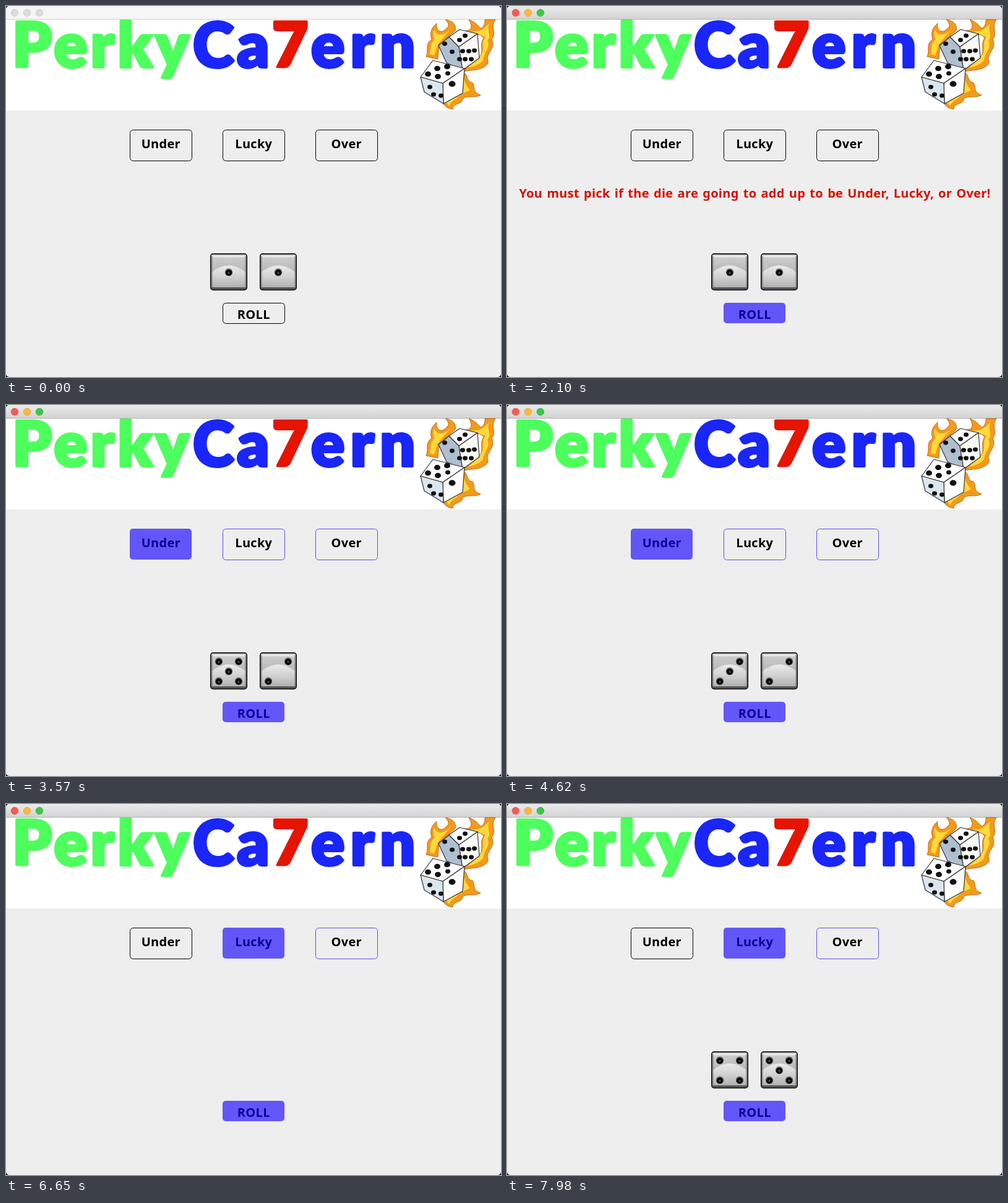
These frames come from a looping animation (800x600 px, 8000 ms). An HTML page:

```html
<!DOCTYPE html>
<html lang="en">
<head>
<meta charset="utf-8">
<title>Dice game</title>
<style>
  html, body { margin: 0; width: 100%; height: 100%; overflow: hidden; background: #000; }
  svg { display: block; width: 800px; height: 600px; }
  text { font: bold 20px "Noto Sans", "Open Sans", sans-serif; letter-spacing: .3px; word-spacing: 1.6px; text-anchor: middle; }
  .title text { font: 900 101px Lato, sans-serif; letter-spacing: 5px; text-anchor: start; stroke-width: 4; stroke-linejoin: round; }
  .green { fill: #4dff5c; stroke: #4dff5c; }
  .blue { fill: #1a26f8; stroke: #1a26f8; }
  .red { fill: #e61400; stroke: #e61400; }
  .button rect { fill: none; stroke: #000; }
  .button.outlined rect { stroke: #5a4cf5; }
  .button.selected rect { fill: #6356f8; stroke: none; transform: translate(-.5px, -.5px); }
  .button.selected text { fill: #0a0096; }
  .light { fill: #dcdcdc; stroke: #c8c8c8; stroke-width: .7; }
  .win { fill: #5cff00; }
  .cube { stroke: #333; stroke-width: 1.2; stroke-linejoin: round; }
</style>
</head>
<body>
<svg viewBox="0 0 800 600">
  <defs>
    <linearGradient id="bar" x2="0" y2="1">
      <stop stop-color="#ebebeb"/><stop offset="1" stop-color="#d2d2d2"/>
    </linearGradient>
    <linearGradient id="face" x2="0" y2="1">
      <stop stop-color="#888"/><stop offset=".06" stop-color="#f2f2f2"/><stop offset=".12" stop-color="#cacaca"/>
      <stop offset=".5" stop-color="#b8b8b8"/><stop offset="1" stop-color="#8c8c8c"/>
    </linearGradient>
    <linearGradient id="dome" x2="0" y2="1">
      <stop stop-color="#ebebeb"/><stop offset=".5" stop-color="#d2d2d2"/><stop offset="1" stop-color="#b0b0b0"/>
    </linearGradient>
    <radialGradient id="pip" cy=".58">
      <stop stop-color="#707070"/><stop offset=".4" stop-color="#000"/>
      <stop offset=".75" stop-color="#111"/><stop offset="1" stop-color="#777"/>
    </radialGradient>
    <clipPath id="window"><rect width="800" height="600" rx="5"/></clipPath>
  </defs>

  <g clip-path="url(#window)">
    <rect width="800" height="600" fill="#eee"/>
    <rect id="titlebar" width="800" height="22"/>
    <path id="barLine" d="M0 21.5H800"/>
    <g id="lights">
      <circle class="light" cx="14" cy="11" r="5.8"/>
      <circle class="light" cx="34" cy="11" r="5.8"/>
      <circle class="light" cx="54" cy="11" r="5.8"/>
    </g>
    <rect y="22" width="800" height="147" fill="#fff"/>

    <g class="title">
      <text class="green" x="10" y="99">Perky</text>
      <text class="blue" x="302" y="99">Ca</text>
      <text class="red" x="430" y="99">7</text>
      <text class="blue" x="493" y="99" style="letter-spacing:9px">ern</text>
    </g>

    <g id="burningDice">
      <g fill="#f29a1c" stroke="#b3560f" stroke-width=".8">
        <path d="M679 82C684 70 676 62 688 54C684 44 688 34 696 28C694 40 704 46 712 36C718 32 714 26 710 22C724 24 728 32 726 40L700 62L698 86Z"/>
        <path d="M742 40C756 40 752 28 748 22C760 26 764 34 768 36C774 32 774 26 774 22H791C782 34 794 44 785 54C792 68 778 74 778 86C784 96 766 104 752 104L738 106L740 96L764 84C774 74 764 62 772 52C768 46 762 46 758 46Z"/>
        <path d="M738 108C748 108 742 122 754 124C760 134 752 138 767 144C756 150 746 144 738 150C738 160 722 156 722 167C714 166 708 162 706 156L730 142Z"/>
      </g>
      <path fill="#ffd93a" d="M685 78C688 66 684 62 693 54C690 48 690 42 692 38C696 50 708 48 718 38L698 62L692 80ZM752 41C764 42 770 40 781 28C776 42 786 46 778 56C784 68 772 74 771 88C764 96 754 98 746 100L766 82C776 70 766 62 775 50ZM741 114C740 126 746 130 750 136C742 140 732 144 728 150C720 154 718 158 716 162L712 156L737 142Z"/>
      <g class="cube">
        <path fill="#aebfd0" d="M699 64L716 50L732 66L738 104L712 92Z"/>
        <path fill="#fff" d="M716 50L733 38L762 45L732 66Z"/>
        <path fill="#f8f8f4" d="M732 66L762 45L765 84L738 104Z"/>
        <path fill="#fff" d="M690 88L741 101L706 125L670 115Z"/>
        <path fill="#fcfcfc" d="M741 101L738 141L707 158L706 125Z"/>
        <path fill="#dbe6ee" d="M670 115L706 125L707 158L676 139Z"/>
      </g>
    </g>

    <g id="buttons"></g>
    <text id="warning" x="400.5" y="310" fill="#d91000">You must pick if the die are going to add up to be Under, Lucky, or Over!</text>
    <g id="result">
      <text class="win" x="400.5" y="300">WINNRAR!!</text>
      <text class="win" x="400.5" y="335.5">Click on Under, Lucky, or Roll to play again!</text>
    </g>
    <g id="dice"></g>
  </g>
</svg>

<script>
const byId = id => document.getElementById(id);

function add(parent, tag, attrs, content = '') {
  const node = document.createElementNS('http://www.w3.org/2000/svg', tag);
  for (const key in attrs) node.setAttribute(key, attrs[key]);
  node.textContent = content;
  return parent.appendChild(node);
}

function show(node, visible) { node.style.display = visible ? '' : 'none'; }

function addButton(parent, label, x, y, width, height, baseline) {
  const group = add(parent, 'g', { class: 'button' });
  add(group, 'rect', { x: x + .5, y: y + .5, width, height, rx: 5 });
  add(group, 'text', { x: x + width / 2 + .3, y: baseline }, label);
  return group;
}

const buttons = byId('buttons');
const under = addButton(buttons, 'Under', 200, 200, 100, 50, 230);
const lucky = addButton(buttons, 'Lucky', 350, 200, 100, 50, 230);
const over = addButton(buttons, 'Over', 500, 200, 100, 50, 230);
const roll = addButton(buttons, 'ROLL', 350, 480, 100, 33, 506);
addButton(byId('result'), 'Play Again?', 325, 350, 150, 30, 376);

// Each pip: x, y and the die values that show it.
const pips = [
  [14, 14, '456'], [46, 14, '23456'], [14, 30, '6'], [30, 30, '135'],
  [46, 30, '6'], [14, 46, '23456'], [46, 46, '456']
];

function addDie(x) {
  const die = add(byId('dice'), 'g', { transform: `translate(${x} 400)` });
  add(die, 'rect', { x: .75, y: .75, width: 58.5, height: 58.5, rx: 4, fill: 'url(#face)', stroke: '#000', 'stroke-width': 1.5 });
  add(die, 'path', { d: 'M2 31Q30 8 58 31V55H2Z', fill: 'url(#dome)' });
  add(die, 'path', { d: 'M2.5 4V56M57.5 4V56', stroke: '#666', 'stroke-width': 2, opacity: .7 });
  add(die, 'path', { d: 'M2 56.5H58', stroke: '#555', 'stroke-width': 3 });
  const dots = pips.map(([cx, cy]) => add(die, 'circle', { cx, cy: cy + .5, r: 6.2, fill: 'url(#pip)' }));
  return value => dots.forEach((dot, i) => show(dot, pips[i][2].includes(value)));
}

const setLeft = addDie(330), setRight = addDie(410);

// Pips of the burning dice: x, y, radius.
[
  [713, 98, 5], [697, 101, 5], [682, 110, 5], [698, 114, 5], [714, 109, 4],
  [721, 126, 5.5], [685, 131, 4], [691, 143, 4], [703, 145, 4],
  [738, 73, 4], [748, 73, 4], [757, 72, 4], [733, 86, 4], [742, 86, 4], [752, 86, 4],
  [733, 55, 4], [742, 48, 4], [709, 61, 4], [721, 74, 4]
].forEach(([cx, cy, r]) => add(byId('burningDice'), 'ellipse', { cx, cy, rx: r, ry: r * .85, fill: '#111' }));

const STEP = 70, LOOP = 8000;
const ACTIVATE = 980, PICK_UNDER = 2520, FIRST_ROLL = 2940;
const WIN = 4830, PICK_LUCKY = 6440, SECOND_ROLL = 7420;
const leftRolls = '264135264535126413642513';
const rightRolls = '513624135246314521365462';

function render(time) {
  const t = time % LOOP;
  const between = (from, to) => t >= from && t < to;

  const active = t >= ACTIVATE;
  byId('titlebar').setAttribute('fill', active ? 'url(#bar)' : '#f6f6f6');
  byId('barLine').setAttribute('stroke', active ? '#b1b1b1' : '#d1d1d1');
  [...byId('lights').children].forEach((light, i) => {
    light.style.fill = active ? ['#f75a55', '#f8b93c', '#3cc84a'][i] : '';
    light.style.stroke = active ? ['#df4744', '#dd9f33', '#27a935'][i] : '';
  });

  const pickedUnder = between(PICK_UNDER, PICK_LUCKY), pickedLucky = t >= PICK_LUCKY;
  under.classList.toggle('selected', pickedUnder);
  lucky.classList.toggle('outlined', pickedUnder);
  lucky.classList.toggle('selected', pickedLucky);
  over.classList.toggle('outlined', pickedUnder || pickedLucky);
  roll.classList.toggle('selected', active);
  show(byId('warning'), between(ACTIVATE, PICK_UNDER));
  show(byId('result'), between(WIN, PICK_LUCKY));

  const rollStart = t >= SECOND_ROLL ? SECOND_ROLL : FIRST_ROLL;
  const step = Math.min(Math.floor((t - rollStart) / STEP), leftRolls.length - 1);
  show(byId('dice'), !between(PICK_LUCKY, SECOND_ROLL));
  setLeft(leftRolls[step] || '1');
  setRight(rightRolls[step] || '1');
}

let start;
function tick(now) {
  start ??= now;
  render(now - start);
  requestAnimationFrame(tick);
}
render(0);
requestAnimationFrame(tick);
</script>
</body>
</html>
```
